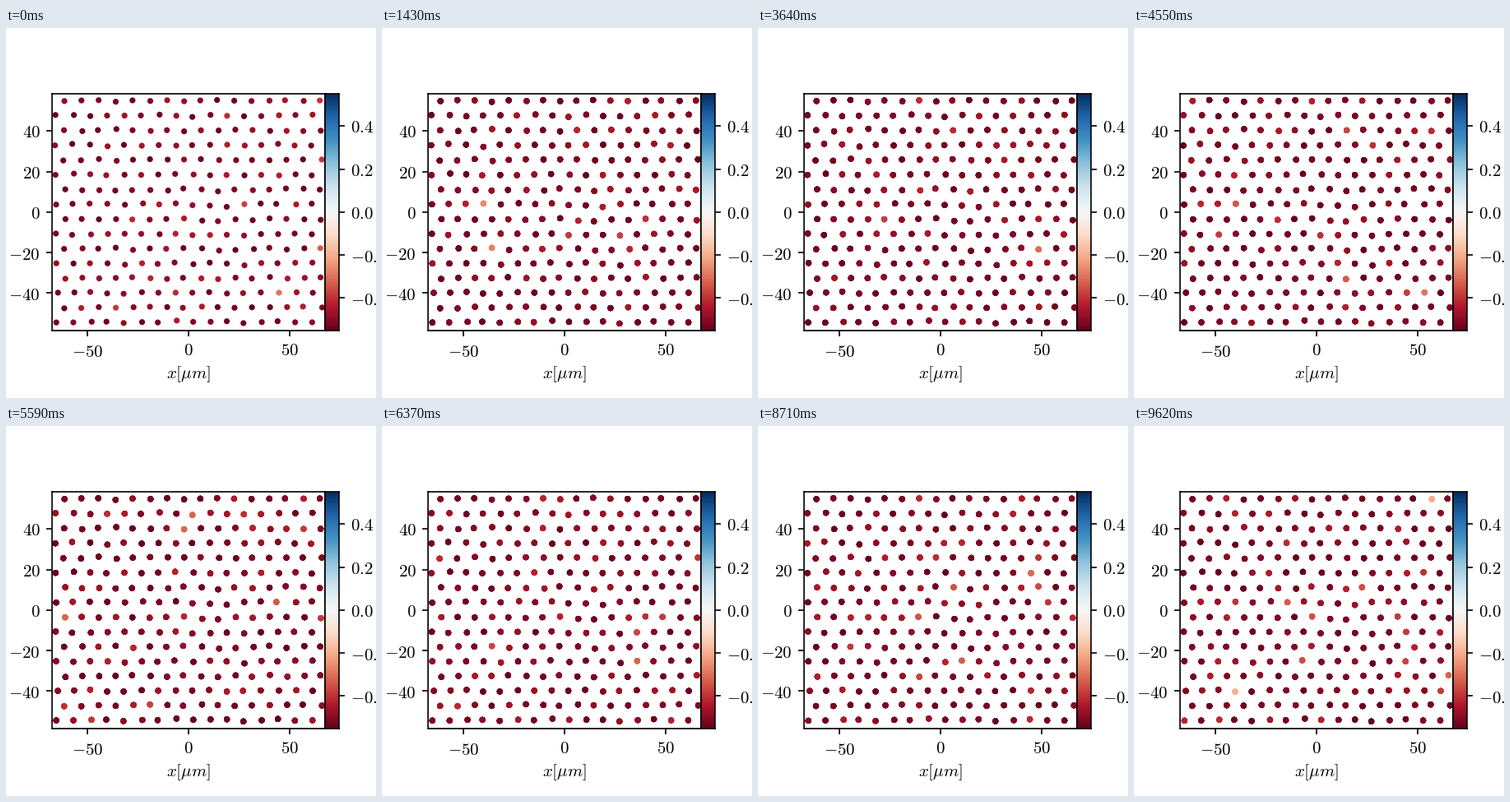
These frames come from a looping animation (450x450 px, 9750 ms). A matplotlib script:

```python
import numpy as np
import matplotlib.pyplot as plt
from matplotlib.animation import FuncAnimation

SIZE, DPI = 450, 150
FRAMES, INTERVAL = 75, 130
SCALE = 2.46                # pixels per micrometre
CX, CY = 222.3, 223.85      # pixel position of the data origin
LEFT, RIGHT, BAR_RIGHT = 56.25, 388.4, 405.0
TOP, BOTTOM = 80.0, 368.0
VMAX = 0.551
LAYERS = 8                  # repainting the dots hardens their edges
GRID = 16                   # rows, and particles per row

plt.rcParams.update({"mathtext.fontset": "cm", "font.size": 10})
rng = np.random.default_rng(7)


def lattice():
    """Triangular crystal in pixels, sagging a little right of the centre."""
    row, col = np.divmod(np.arange(GRID * GRID), GRID)
    x = np.where(row % 2, 61.0, 71.2) + 20.78 * col
    y = 88.6 + 17.97 * row
    y += 2.5 * np.exp(-((x - 270) / 35) ** 2 - ((y - 230) / 50) ** 2)
    return np.column_stack([x, y])


base = lattice()
base += rng.normal(0, 0.8, base.shape)
tremble = rng.normal(0, 0.15, (FRAMES,) + base.shape)
points = (base + tremble - (CX, CY)) / (SCALE, -SCALE)
values = -VMAX + rng.exponential(0.044, (FRAMES, len(base)))

fig = plt.figure(figsize=(SIZE / DPI, SIZE / DPI), dpi=DPI, facecolor="white")


def pixel_axes(x0, x1):
    return fig.add_axes([x0 / SIZE, 1 - BOTTOM / SIZE,
                         (x1 - x0) / SIZE, (BOTTOM - TOP) / SIZE])


def label(x, baseline, text, ha):
    fig.text(x / SIZE, 1 - baseline / SIZE, f"${text}$", ha=ha, va="baseline")


def side_label(x, y, value, text, ha):
    """Centre a label on its tick; the minus sign lowers it slightly."""
    label(x, y + 7.95 + (value < 0), text, ha)


ax = pixel_axes(LEFT, RIGHT)
ax.set_xlim((LEFT - CX) / SCALE, (RIGHT - CX) / SCALE)
ax.set_ylim((CY - BOTTOM) / SCALE, (CY - TOP) / SCALE)
xticks, yticks = range(-50, 51, 50), range(-40, 41, 20)
ax.set_xticks(xticks, [])
ax.set_yticks(yticks, [])
for v in xticks:
    label(CX - 0.5 + v * SCALE, 397.6 + 2 * (v < 0), v, "center")
for v in yticks:
    side_label(41.7, CY - v * SCALE, v, v, "right")
label(CX - 0.8, 426, r"x[\mu m]", "center")

bar = pixel_axes(RIGHT, BAR_RIGHT)
bar.imshow(np.linspace(-VMAX, VMAX, 256)[:, None], cmap="RdBu",
           origin="lower", aspect="auto", extent=(0, 1, -VMAX, VMAX))
bar_scale = (BOTTOM - TOP) / (2 * VMAX)
bar.set_ylim((CY - BOTTOM) / bar_scale, (CY - TOP) / bar_scale)
levels = np.arange(-2, 3) / 5
bar.set_xticks([])
bar.yaxis.tick_right()
bar.set_yticks(levels, [])
for v in levels:
    side_label(419.3, CY - v * bar_scale, v, f"{v:.1f}", "left")

dots = ax.scatter(*points[0].T, c=values[0], s=11.9, linewidths=0,
                  cmap="RdBu", vmin=-VMAX, vmax=VMAX)


def update(i):
    layers = min(i + 1, LAYERS)
    dots.set_offsets(np.tile(points[i], (layers, 1)))
    dots.set_array(np.tile(values[i], layers))
    return dots,


anim = FuncAnimation(fig, update, frames=FRAMES, interval=INTERVAL, repeat=True)
plt.show()
```
